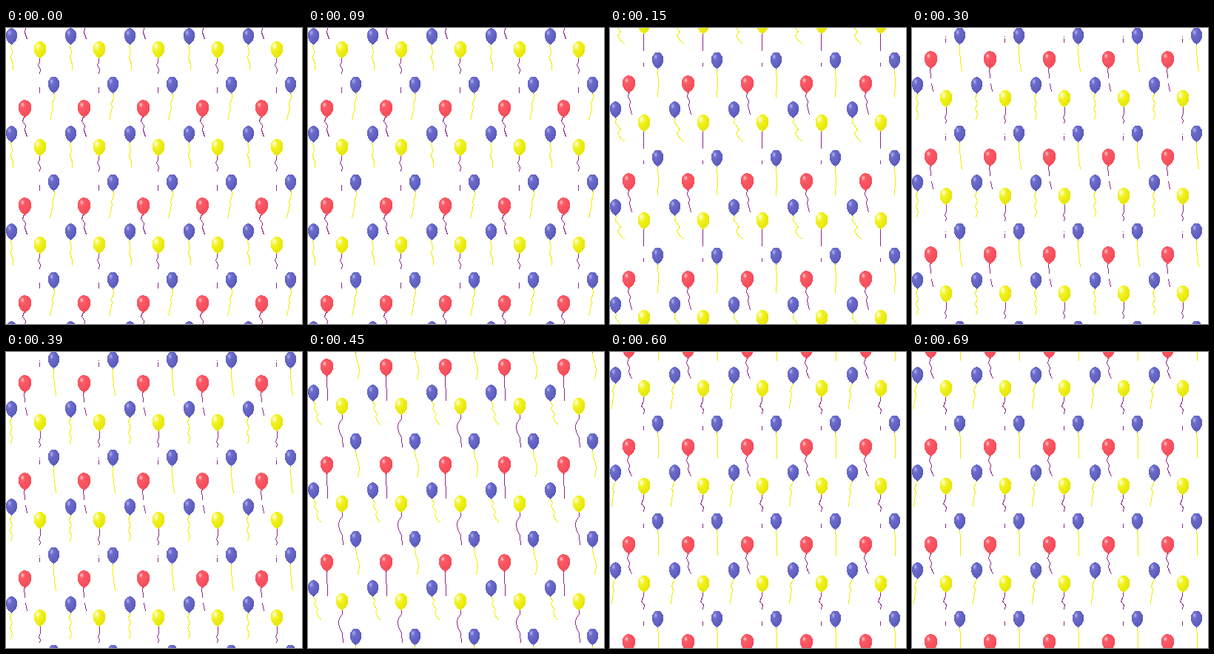
Recreate the animation shown at these times as an HTML page without scripts. Size 400 by 400 pixels, loop 0.75 s.

```html
<!DOCTYPE html>
<html lang="en">
<head>
<meta charset="utf-8">
<title>Rising balloons</title>
<style>
  html, body { margin: 0; width: 100%; height: 100%; overflow: hidden; background: #fff; }
  svg { display: block; width: 400px; height: 400px; shape-rendering: crispEdges; }
  pattern path { fill: none; stroke-width: 1; }
  .yellow { stroke: #eeee00; }
  .purple { stroke: #8a2a8a; }
  .pose {
    visibility: hidden;
    animation: show .75s step-end infinite;
    animation-delay: calc(var(--i) * .15s - .75s);
  }
  @keyframes show {
    0% { visibility: visible; }
    20%, 100% { visibility: hidden; }
  }
</style>
</head>
<body>
<svg viewBox="0 0 400 400">
  <defs>
    <radialGradient id="blue" cx=".32" cy=".28" r=".75">
      <stop offset="0" stop-color="#b4b4f0"/>
      <stop offset=".25" stop-color="#6c6ccc"/>
      <stop offset="1" stop-color="#5858b8"/>
    </radialGradient>
    <radialGradient id="red" cx=".32" cy=".28" r=".75">
      <stop offset="0" stop-color="#ffd0d0"/>
      <stop offset=".22" stop-color="#fc5a66"/>
      <stop offset="1" stop-color="#f24a58"/>
    </radialGradient>
    <radialGradient id="gold" cx=".3" cy=".28" r=".75">
      <stop offset="0" stop-color="#ffffe0"/>
      <stop offset=".35" stop-color="#f2f220"/>
      <stop offset="1" stop-color="#e4e400"/>
    </radialGradient>
    <path id="balloon" style="fill:inherit" d="M-1 12L-1 11C-5 9 -8 4 -8 -1C-8 -7 -4 -11 0 -11S8 -7 8 -1C8 4 5 9 1 11L1 12Z"/>

    <g id="balloons">
      <use href="#balloon" fill="url(#blue)" transform="translate(7.5 11) scale(.96 1)"/>
      <use href="#balloon" fill="url(#gold)" transform="translate(46 29) scale(1.06 1.02)"/>
      <use href="#balloon" fill="url(#blue)" transform="translate(64.5 76.5) scale(.96 1)"/>
      <use href="#balloon" fill="url(#red)" transform="translate(25.5 108.5) scale(1.1 1.04)"/>
    </g>

    <!-- Each cell is drawn twice so strings wrap past the tile edge. -->
    <pattern id="p0" width="80" height="132" patternUnits="userSpaceOnUse">
      <g id="c0">
        <path class="yellow" d="M6.5 23L8.5 33L6.5 40L9.5 49V57M65.5 88V95L62.5 102L63.5 107L59.5 125"/>
        <path class="purple" d="M45.5 41V46L43.5 50L46.5 56L45.5 62M45.5 80V88M24.5 120L22.5 126L26.5 132L25.5 138L28.5 147"/>
        <use href="#balloons"/>
      </g>
      <use href="#c0" y="-132"/>
    </pattern>

    <pattern id="p1" width="80" height="132" patternUnits="userSpaceOnUse" patternTransform="translate(0 -33)">
      <g id="c1">
        <path class="yellow" d="M8.5 23L7.5 29L14.5 38L10.5 43L14.5 50L19.5 54M64.5 88L65.5 108L64.5 127"/>
        <path class="purple" d="M45.5 41V64M45.5 80V85M25.5 120L24.5 126L27.5 132L26.5 138L29.5 150"/>
        <use href="#balloons"/>
      </g>
      <use href="#c1" y="-132"/>
    </pattern>

    <pattern id="p2" width="80" height="132" patternUnits="userSpaceOnUse" patternTransform="translate(0 -66)">
      <g id="c2">
        <path class="yellow" d="M7.5 23L5.5 29L8.5 36L5.5 43L8.5 50L6.5 58M64.5 88V98L65.5 110L67.5 125"/>
        <path class="purple" d="M46.5 41V50L44.5 55L46.5 59L45.5 63M45.5 77V78M45.5 80V86M24.5 120L25.5 134M26.5 141L28.5 152"/>
        <use href="#balloons"/>
      </g>
      <use href="#c2" y="-132"/>
    </pattern>

    <pattern id="p3" width="80" height="132" patternUnits="userSpaceOnUse" patternTransform="translate(0 -88)">
      <g id="c3">
        <path class="yellow" d="M7.5 23L10.5 28L8.5 33L13.5 40L11.5 44L13.5 49L17.5 54M64.5 88L65.5 98L68.5 106L69.5 114L67.5 125"/>
        <path class="purple" d="M46.5 41V46L42.5 52L41.5 57L42.5 64L46.5 72L47.5 85M25.5 120V135L26.5 139V154"/>
        <use href="#balloons"/>
      </g>
      <use href="#c3" y="-132"/>
    </pattern>

    <pattern id="p4" width="80" height="132" patternUnits="userSpaceOnUse" patternTransform="translate(0 -112)">
      <g id="c4">
        <path class="yellow" d="M7.5 23L3.5 32L5.5 38L3.5 46L2.5 57M64.5 88L65.5 100V124"/>
        <path class="purple" d="M45.5 41V46L42.5 53L46.5 58L45.5 64M45.5 80V86M25.5 120L23.5 127L26.5 133L25.5 139L29.5 148"/>
        <use href="#balloons"/>
      </g>
      <use href="#c4" y="-132"/>
    </pattern>
  </defs>

  <rect class="pose" style="--i:0" width="400" height="400" fill="url(#p0)"/>
  <rect class="pose" style="--i:1" width="400" height="400" fill="url(#p1)"/>
  <rect class="pose" style="--i:2" width="400" height="400" fill="url(#p2)"/>
  <rect class="pose" style="--i:3" width="400" height="400" fill="url(#p3)"/>
  <rect class="pose" style="--i:4" width="400" height="400" fill="url(#p4)"/>
</svg>
</body>
</html>
```
